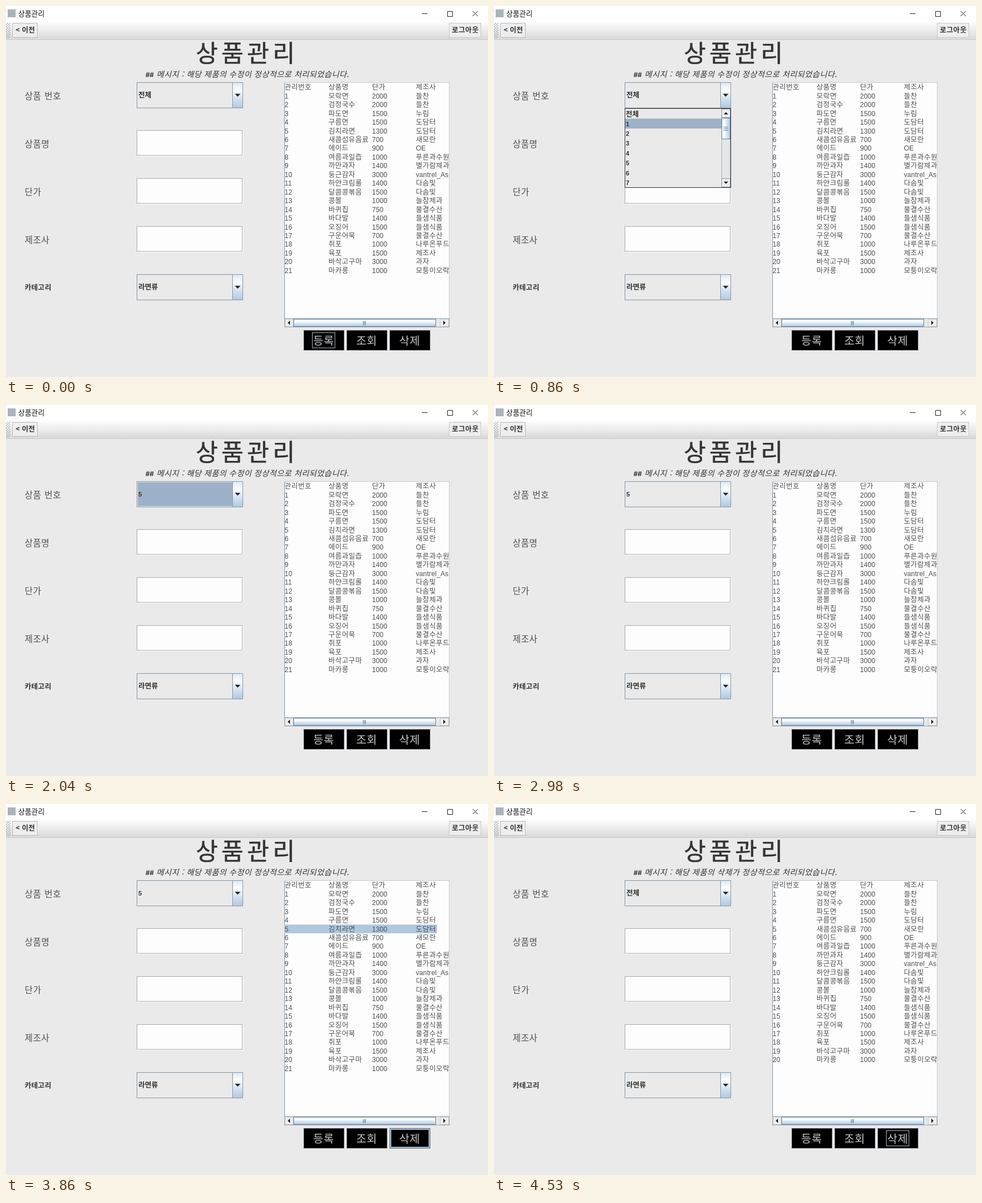
Animation, 852 px wide and 657 px high, one loop 4860 ms. Source, as an HTML page:

```html
<!DOCTYPE html>
<html lang="ko">
<head>
<meta charset="utf-8">
<title>상품관리</title>
<style>
html, body { margin: 0; width: 852px; height: 657px; overflow: hidden; background: #eaeaea; }
svg { display: block; }
text { font-family: "Noto Sans CJK KR", "Noto Sans CJK JP", "Noto Sans CJK", sans-serif; white-space: pre; }
text.latin { font-family: "Liberation Sans", sans-serif; }
</style>
</head>
<body>
<script>
const LOOP = 4860, INK = '#333', SOFT = '#505050', EDGE = '#8496a8', PAPER = '#fdfdfd', PICK = '#9db2c8';

// name, price, maker
const goods = `모락면,2000,들찬
검정국수,2000,들찬
파도면,1500,누림
구름면,1500,도담터
김치라면,1300,도담터
새콤섬유음료,700,새모란
에이드,900,OE
여름과일즙,1000,푸른과수원
까만과자,1400,별가람제과
둥근감자,3000,vantrel_As
하얀크림롤,1400,다솜빛
달콤콩볶음,1500,다솜빛
콩볼,1000,늘참제과
바퀴칩,750,물결수산
바다발,1400,들샘식품
오징어,1500,들샘식품
구운어묵,700,물결수산
쥐포,1000,나루온푸드
육포,1500,제조사
바삭고구마,3000,과자
마카롱,1000,모퉁이오락`.split('\n').map(line => line.split(','));

const rect = (x, y, w, h, fill, extra = '') =>
  `<rect x="${x}" y="${y}" width="${w}" height="${h}" fill="${fill}" ${extra}/>`;
const frame = (x, y, w, h, fill, stroke = EDGE) =>
  rect(x + .5, y + .5, w - 1, h - 1, fill, `stroke="${stroke}"`);
const path = (d, stroke, extra = '') => `<path d="${d}" fill="none" stroke="${stroke}" ${extra}/>`;
const text = (x, y, s, size, fill = INK, extra = '') =>
  `<text x="${x}" y="${y}" font-size="${size}" fill="${fill}" ${/^[ -~]+$/.test(s) ? 'class="latin"' : ''} ${extra}>${s.replace('<', '&lt;')}</text>`;
const bold = (x, y, s, extra = '') => text(x, y, s, /^\d+$/.test(s) ? 11 : 12.5, INK, `font-weight="700" ${extra}`);
const cell = (x, y, s) => /^[ -~]+$/.test(s)
  ? text(x, y, s, 12, SOFT, 'letter-spacing=".1"')
  : text(x, y, s, 12.5, SOFT, 'font-weight="300" letter-spacing=".35"');
const group = (id, body, extra = '') => `<g id="${id}" ${extra}>${body}</g>`;
// small triangle pointing along (dx, dy)
const arrow = (x, y, dx, dy, r = 4) =>
  `<path d="M${x + dx * r / 2} ${y + dy * r / 2}L${x - dx * r / 2 - dy * r} ${y - dy * r / 2 - dx * r}L${x - dx * r / 2 + dy * r} ${y - dy * r / 2 + dx * r}Z" fill="#222"/>`;

const label = (y, s) => text(33, y, s, 15.5, SOFT, 'font-weight="300" letter-spacing=".4" word-spacing="1"');

const field = y => frame(231, y, 187, 45, PAPER, '#a3adb6') +
  path(`M232 ${y + 45.5}H418.5V${y + 1}`, '#fff');

const combo = (y, inner) => frame(231, y, 188, 46, '#eaeaea') + inner +
  frame(400, y, 19, 46, 'url(#steelV)') + arrow(409.5, y + 23, 0, 1, 5);

const listing = rows => [['관리번호', '상품명', '단가', '제조사'], ...rows.map((r, i) => [String(i + 1), ...r])]
  .map((row, n) => row.map((s, c) => cell([492.5, 570, 647, 724.5][c], (148.3 + 15.45 * n).toFixed(2), s)).join('')).join('');

const button = (x, s) => frame(x, 574, 72, 36, '#000', '#5a626a') +
  text(x + 17, 599.5, s, 19.5, '#c4c4c4', 'font-weight="300" letter-spacing=".6"');
const focusBox = (id, x) => group(id, frame(x, 578, 41, 28, 'none', '#a4b3c2'));

const popup = frame(231, 181, 188, 141, '#eaeaea', '#333') +
  rect(232, 182, 170, 17.5, PICK, 'id="hover"') +
  ['전체', 1, 2, 3, 4, 5, 6, 7].map((s, i) => bold(233, 195.6 + i * 17.45 - (i ? .5 : 0), String(s))).join('') +
  frame(402, 182, 16, 139, '#e4e6e8', '#a5b0ba') +
  frame(402, 182, 16, 16, '#eee') + arrow(410, 190, 0, -1) +
  frame(402, 198, 16, 38, 'url(#steelH)', '#6382a0') +
  path('M406 214.5H414M406 217.5H414M406 220.5H414', '#6382a0') +
  frame(402, 305, 16, 16, '#eee') + arrow(410, 313, 0, 1);

const steel = (id, dir) => `<linearGradient id="${id}" ${dir}><stop stop-color="#dde8f3"/>
  <stop offset=".3" stop-color="#fff"/><stop offset=".55" stop-color="#dde8f3"/><stop offset="1" stop-color="#b0c9e0"/></linearGradient>`;

const message = (id, verb) => group(id,
  text(266, 126, `메시지 : 해당 제품의 ${verb} 정상적으로 처리되었습니다.`, 14, INK,
    'font-style="italic" font-weight="300" letter-spacing=".42"'));

document.body.innerHTML = `<svg width="852" height="657" viewBox="0 0 852 657">
<defs>
  ${steel('steelV', 'x1="0" x2="0" y1="0" y2="1"')}${steel('steelH', '')}
  <linearGradient id="bar" x2="0" y2="1"><stop stop-color="#fff"/><stop offset="1" stop-color="#d9d9d9"/></linearGradient>
  <pattern id="dots" width="4" height="4" patternUnits="userSpaceOnUse">${rect(0, 0, 1.4, 1.4, '#8d9399') + rect(2, 2, 1.4, 1.4, '#8d9399')}</pattern>
  <clipPath id="pane">${rect(492, 136, 291, 417, '#fff')}</clipPath>
</defs>` +
  // window title and toolbar
  rect(0, 0, 852, 657, '#eaeaea') + rect(0, 0, 852, 27, '#fff') +
  rect(3, 6, 14, 14, '#a9b4bd') + text(21.5, 18, '상품관리', 12.7, '#111') +
  path('M735 13.5H745M780.5 9.5H789.5V18.5H780.5ZM825 9L834 18M834 9L825 18', '#222') +
  rect(0, 27, 852, 32, 'url(#bar)') + rect(0, 59, 852, 1, '#cacaca') + rect(0, 30, 8, 27, 'url(#dots)') +
  frame(11, 30, 45, 26, '#eee', '#b5bcc3') + bold(17, 47, '< 이전') +
  frame(783, 30, 57, 26, '#eee', '#c6cbd0') + bold(788, 47, '로그아웃', 'letter-spacing=".4"') +
  // heading and message
  text(335.5, 98.5, '상품관리', 42.5, INK, `letter-spacing="6.2" stroke="${INK}" stroke-width=".5"`) +
  text(246.5, 126, '##', 13, '#111', 'font-weight="700" font-style="italic"') +
  message('edited', '수정이') + message('deleted', '삭제가') +
  // form
  label(165, '상품 번호') + label(250, '상품명') + label(335, '단가') + label(420, '제조사') + bold(33, 503, '카테고리', 'letter-spacing=".3"') +
  combo(135, rect(233, 137, 167, 42, PICK, 'id="picked"') + bold(234, 162, '전체', 'id="all"') + bold(234, 162, '5', 'id="five"')) +
  rect(401, 136, 17, 44, '#a5bfda', 'id="pressed"') + group('pressedArrow', arrow(409.5, 158, 0, 1, 5)) +
  field(220) + field(305) + field(390) +
  combo(475, bold(234, 502, '라면류')) +
  group('popup', popup) +
  // product list
  frame(492, 135, 292, 434, PAPER, '#c3cad1') + path('M492.5 136V569', EDGE) +
  rect(492, 213.5, 270, 15.5, '#b0c8df', 'id="selection"') +
  group('before', listing(goods), 'clip-path="url(#pane)"') +
  group('after', listing(goods.filter((_, i) => i != 4)), 'clip-path="url(#pane)"') +
  frame(492, 553, 292, 16, '#e6e8ea', '#9aa6b1') +
  frame(493, 554, 15, 14, '#eee', '#c4cad0') + arrow(500, 561, -1, 0) +
  frame(508, 554, 252, 14, 'url(#steelV)', '#6382a0') + path('M631.5 558V565M633.5 558V565M635.5 558V565', '#6382a0') +
  frame(767, 554, 16, 14, '#eee', '#c4cad0') + arrow(775, 561, 1, 0) +
  // actions
  button(526, '등록') + button(602, '조회') + button(678, '삭제') +
  focusBox('focusAdd', 541) + focusBox('focusDelete', 693) +
  group('armed', rect(680, 576, 68, 32, 'none', 'stroke="#a9c3dc" stroke-width="2"')) +
  '</svg>';

const $ = id => document.getElementById(id);
const show = (on, ...ids) => ids.forEach(id => $(id).style.display = on ? '' : 'none');
// value of the last step reached at time t
const step = (t, steps, start) => steps.reduce((v, [at, next]) => t >= at ? next : v, start);

const hoverSteps = [[850, 1], [950, 2], [1110, 3], [1180, 4], [1250, 5]];
const dragSteps = [[3040, 748], [3070, 736], [3100, 724], [3130, 674], [3160, 647], [3190, 605], [3210, 570], [3370, 499], [3400, 492]];

function render(t) {
  const within = (a, b) => t >= a && t < b;
  show(t < 480, 'focusAdd');
  show(within(480, 600), 'pressed', 'pressedArrow');
  show(within(480, 1480), 'popup');
  $('hover').setAttribute('y', 182 + 17.45 * step(t, hoverSteps, 0));

  const five = within(1290, 4100);
  show(five, 'five');
  show(!five, 'all');
  show(within(1480, 2980), 'picked');

  const left = step(t, dragSteps, 762);
  $('selection').setAttribute('x', left);
  $('selection').setAttribute('width', 762 - left);

  const done = t >= 4100;
  show(!done, 'selection', 'before', 'edited');
  show(done, 'after', 'deleted');
  show(within(3860, 4050), 'armed');
  show(t >= 4050, 'focusDelete');
}

const origin = performance.now();
(function tick() {
  render((performance.now() - origin) % LOOP);
  requestAnimationFrame(tick);
})();
</script>
</body>
</html>
```
